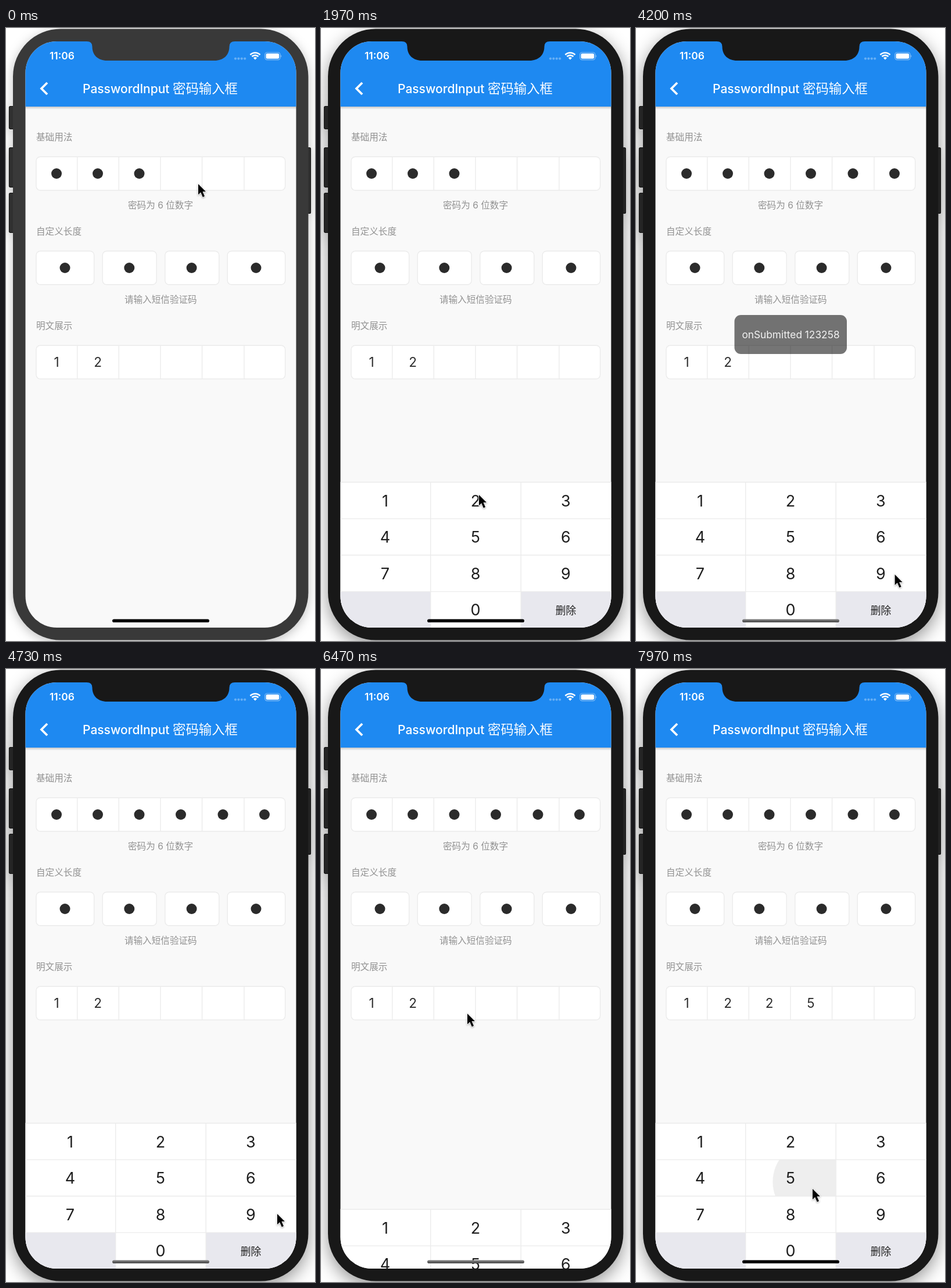
Recreate the animation shown at these times as an HTML page. Size 532 by 1053 pixels, loop 8 s.

```html
<!DOCTYPE html>
<html lang="zh">
<head>
<meta charset="utf-8">
<title>PasswordInput</title>
<style>
  html, body { margin: 0; width: 100%; height: 100%; overflow: hidden; background: #fff; }
  svg { display: block; width: 532px; height: 1053px; }
  text { font-family: Inter, "Noto Sans CJK SC", "Noto Sans CJK", sans-serif; fill: #2b2b2b; }
  .mid { text-anchor: middle; }
  .note { font-size: 15.6px; fill: #919191; }
  .digit { font-size: 22.5px; }
  .key { font-size: 27px; fill: #1f1f1f; }
  .title { font-size: 21px; font-weight: 500; fill: #fff; }
  .box { fill: #fff; stroke: #ebebeb; stroke-width: 1.4; }
  .line { stroke: #ebebeb; stroke-width: 1.4; }
  .dot { fill: #2b2b2b; }
  #phone { --body: #181818; --button: #252525; filter: drop-shadow(0 9px 15px rgba(0, 0, 0, .42)); }
  #phone.idle { --body: #393939; --button: #303030; filter: drop-shadow(0 4px 9px rgba(0, 0, 0, .25)); }
  #phone .button { fill: var(--button); stroke: #111; stroke-width: 1.2; }
  #phone .body, #notch { fill: var(--body); }
  #notch { --body: #181818; }
  #notch.idle { --body: #393939; }
</style>
</head>
<body>
<svg viewBox="0 0 532 1053">
  <defs>
    <clipPath id="screenClip"><rect x="33.5" y="23" width="466" height="1007" rx="54"/></clipPath>
    <clipPath id="keyClip"><rect id="keyRect" width="155" height="62.5"/></clipPath>
    <clipPath id="wifiClip"><path d="M429 54.5 L415 40.5 V36 H443 V40.5 Z"/></clipPath>
    <linearGradient id="headShade" x2="0" y2="1">
      <stop stop-color="#000" stop-opacity=".2"/><stop offset="1" stop-color="#000" stop-opacity="0"/>
    </linearGradient>
    <linearGradient id="barShade" x2="0" y2="1">
      <stop stop-color="#858585"/><stop offset="1" stop-color="#454545"/>
    </linearGradient>
  </defs>

  <g id="phone">
    <g class="button">
      <rect x="5.5" y="134.5" width="12" height="39" rx="2"/>
      <rect x="5.5" y="205.5" width="12" height="68" rx="2"/>
      <rect x="5.5" y="283.5" width="12" height="68" rx="2"/>
      <rect x="512" y="205.5" width="12.5" height="113" rx="2"/>
    </g>
    <rect class="body" x="12" y="1.5" width="508.5" height="1050" rx="82"/>
  </g>

  <g clip-path="url(#screenClip)">
    <rect x="33" y="23" width="468" height="1008" fill="#f9f9f9"/>
    <rect x="33" y="135" width="468" height="5" fill="url(#headShade)"/>
    <rect x="33" y="23" width="468" height="112" fill="#1e89f1"/>
    <g id="form"></g>
    <g id="pad"></g>
    <rect id="bar" x="183" y="1015.5" width="167" height="5.6" rx="2.8"/>
  </g>

  <path id="notch" d="M139 22 V23 Q148.5 23 148.5 32 C148.5 47 159 56 174 56 H359 C374 56 384.5 47 384.5 32 Q384.5 23 394 23 V22 Z"/>
  <text x="75" y="54" font-size="17.4" font-weight="600" style="fill:#fff">11:06</text>
  <g fill="#fff">
    <g id="signal" opacity=".32"></g>
    <g clip-path="url(#wifiClip)" fill="none" stroke="#fff" stroke-width="2.7">
      <circle cx="429" cy="54.5" r="2.2" stroke-width="4.4"/>
      <circle cx="429" cy="54.5" r="7.7"/>
      <circle cx="429" cy="54.5" r="12"/>
    </g>
    <rect x="445.8" y="42" width="26.2" height="12.6" rx="3.6" fill="none" stroke="#fff" stroke-opacity=".45" stroke-width="1.2"/>
    <rect x="447.6" y="43.8" width="22.6" height="9" rx="2.2"/>
    <path d="M473.2 46 Q475.4 48.3 473.2 50.6 Z" opacity=".5"/>
  </g>
  <path d="M71 94 L61 104 L71 114" fill="none" stroke="#fff" stroke-width="3.8"/>
  <text class="title" x="132" y="112">PasswordInput</text>
  <text class="title" x="287" y="112" style="font-size:22.4px">密码输入框</text>

  <g id="toast">
    <rect x="169.5" y="493" width="193.5" height="67" rx="11" opacity=".54"/>
    <text class="mid" x="266.5" y="533" font-size="17.3" style="fill:#f3f3f3">onSubmitted 123258</text>
  </g>
  <path id="cursor" d="M0 0 V18.2 L4.2 14.3 L7.8 22.4 L11 21 L7.5 13.1 H13 Z" stroke="#fff" stroke-width="1.5"
    paint-order="stroke" style="filter:drop-shadow(0 1.5px 1.5px rgba(0,0,0,.35))"/>
</svg>

<script>
const LOOP = 8000;
const $ = id => document.getElementById(id);

function add(parent, tag, attrs, text) {
  const el = document.createElementNS('http://www.w3.org/2000/svg', tag);
  for (const k in attrs) el.setAttribute(k, attrs[k]);
  if (text !== undefined) el.textContent = text;
  return parent.appendChild(el);
}

const form = $('form'), pad = $('pad');
const cellX = [87, 158, 229.5, 301, 373.5, 445];
const box = (x, y, w) => add(form, 'rect', { class: 'box', x, y, width: w, height: 57.4, rx: 7 });
const line = (parent, x1, y1, x2, y2) => add(parent, 'line', { class: 'line', x1, y1, x2, y2 });
const dot = (x, y) => add(form, 'circle', { class: 'dot', cx: x, cy: y, r: 9 });
const label = (x, y, text, cls = '') => add(form, 'text', { class: 'note ' + cls, x, y }, text);

function sixCells(y) {
  box(52, y, 428.7);
  for (const x of [122.7, 194.2, 266, 337.6, 410]) line(form, x, y, x, y + 57.4);
}

label(52, 193, '基础用法');
sixCells(221.3);
const dots = cellX.map(x => dot(x, 250));
label(266, 310, '密码为 6 位数字', 'mid');

label(52, 355, '自定义长度');
for (const [x, w] of [[52, 99.7], [166.2, 93], [273.8, 93], [381.2, 99.5]]) box(x, 383.3, w);
for (const x of [101.5, 212.3, 319.6, 430.5]) dot(x, 412);
label(266.3, 472, '请输入短信验证码', 'mid');

label(52, 517, '明文展示');
sixCells(545.3);
const digits = [1, 2, 2, 5].map((n, i) =>
  add(form, 'text', { class: 'digit mid', x: cellX[i], y: 582 }, n));

// Keypad
const colX = [33, 188.7, 344.2], keyX = [110.5, 266, 421.3];
const rowY = r => 780.3 + r * 62.6;
add(pad, 'rect', { x: 33, y: 780.3, width: 468, height: 251, fill: '#fff' });
for (const x of [33, 344.2]) add(pad, 'rect', { x, y: rowY(3), width: 155.6, height: 64, fill: '#e8e8ee' });
const ripple = add(pad, 'circle', { 'clip-path': 'url(#keyClip)' });
for (let r = 0; r < 4; r++) line(pad, 33, rowY(r), 500, rowY(r));
for (const x of colX.slice(1)) line(pad, x, 780.3, x, 1031);
for (let i = 0; i < 9; i++)
  add(pad, 'text', { class: 'key mid', x: keyX[i % 3], y: 821.7 + (i / 3 | 0) * 62.6 }, i + 1);
add(pad, 'text', { class: 'key mid', x: 266, y: 1009.4 }, 0);
add(pad, 'text', { class: 'key mid', x: 421.5, y: 1006.6, style: 'font-size:17.8px' }, '删除');

for (let i = 0; i < 4; i++) add($('signal'), 'circle', { cx: 395 + i * 5.4, cy: 52.6, r: 2.1 });

// Pointer path: time, x, y
const path = [
  [0, 331, 268], [150, 331, 268], [850, 307, 246], [1560, 307, 246], [1960, 272, 802],
  [2380, 272, 802], [2620, 268, 872], [2980, 268, 872], [3240, 267, 935], [3780, 267, 935],
  [4400, 503, 940], [4730, 467, 936], [5100, 460, 900], [5800, 270, 600], [6150, 252, 592],
  [6960, 252, 592], [7280, 272, 806], [7560, 272, 806], [7800, 304, 893], [LOOP, 304, 893]
];
// Key taps: time, x, y, row of the middle column
const taps = [[2150, 272, 802, 0], [2740, 268, 872, 1], [3397, 267, 935, 2], [7400, 272, 806, 0], [7853, 305, 881, 1]];
const slides = [[1340, 0], [6359, 1], [6800, 0]];

const smooth = p => (p = Math.min(1, Math.max(0, p)), p * p * (3 - 2 * p));
const show = (el, on) => el.style.display = on ? '' : 'none';

function pointer(t) {
  const i = path.findIndex(k => k[0] > t);
  const a = path[i - 1], b = path[i], p = smooth((t - a[0]) / (b[0] - a[0]));
  return [a[1] + (b[1] - a[1]) * p, a[2] + (b[2] - a[2]) * p];
}

function padOffset(t) {
  let down = 1;
  for (const [at, to] of slides) down += (to - down) * smooth((t - at) / 200);
  return down * 251;
}

function draw(t) {
  const idle = t < 900;
  $('phone').classList.toggle('idle', idle);
  $('notch').classList.toggle('idle', idle);

  const [x, y] = pointer(t);
  $('cursor').setAttribute('transform', `translate(${x} ${y})`);
  pad.setAttribute('transform', `translate(0 ${padOffset(t)})`);

  dots.forEach((d, i) => show(d, i < 3 || t >= taps[i - 3][0]));
  digits.forEach((d, i) => show(d, i < 2 || t >= taps[i + 1][0]));

  const tap = taps.find(k => t >= k[0] && t < k[0] + 300);
  show(ripple, tap);
  if (tap) {
    const age = t - tap[0];
    $('keyRect').setAttribute('x', colX[1]);
    $('keyRect').setAttribute('y', rowY(tap[3]));
    ripple.setAttribute('cx', tap[1]);
    ripple.setAttribute('cy', tap[2]);
    ripple.setAttribute('r', Math.min(age, 200) * 0.59);
    ripple.setAttribute('opacity', 0.11 * (1 - age / 300));
  }

  const toast = $('toast');
  show(toast, t >= 3397 && t < 4600);
  toast.setAttribute('opacity', 1 - smooth((t - 4450) / 150));
  $('bar').setAttribute('fill', t >= 3390 && t < 6950 ? 'url(#barShade)' : '#000');
}

const start = performance.now();
function tick() {
  draw((performance.now() - start) % LOOP);
  requestAnimationFrame(tick);
}
tick();
</script>
</body>
</html>
```
